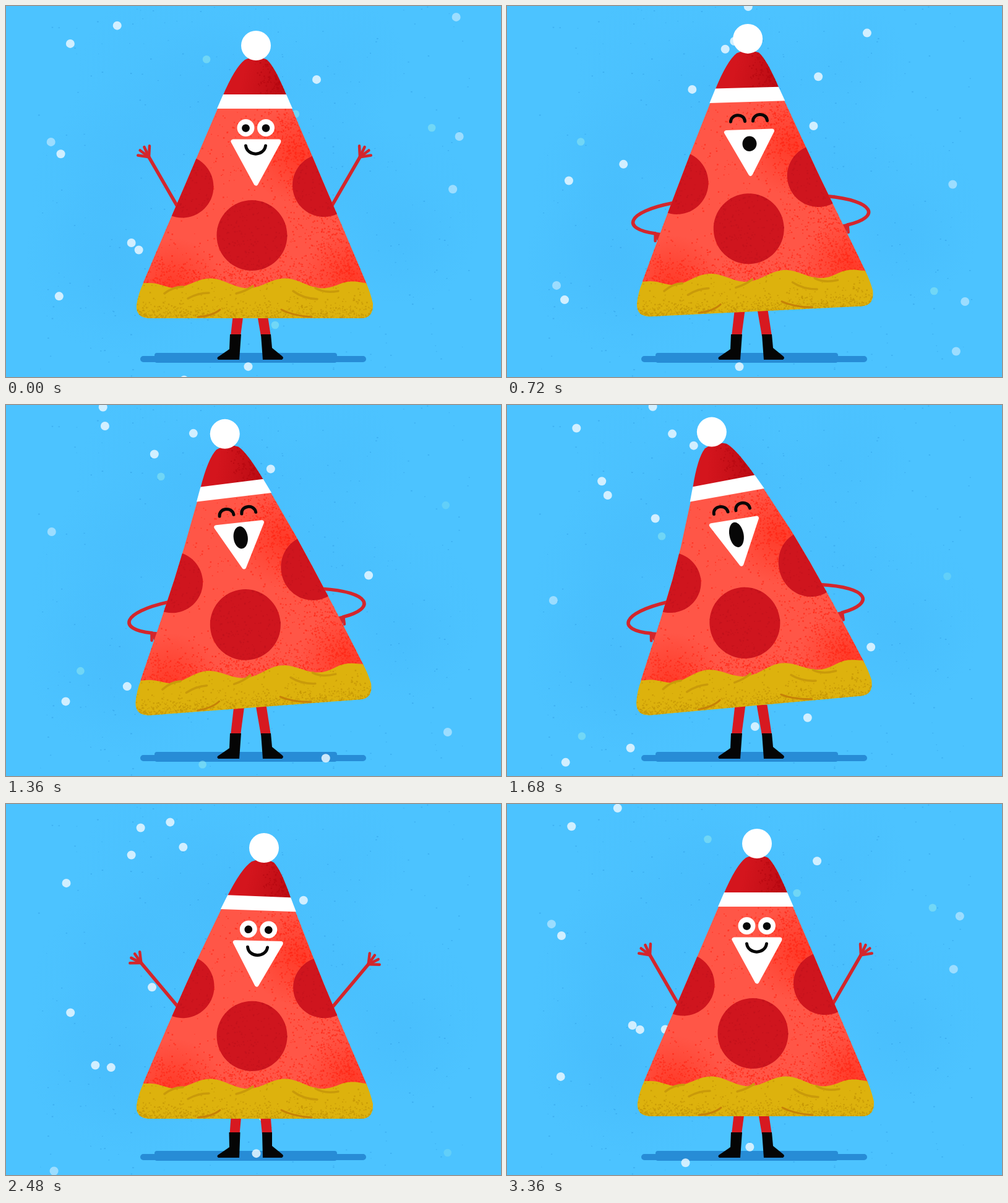
An HTML page with a canvas for the animation above (3.44 s loop, 800 by 600 pixels).

```html
<!DOCTYPE html>
<html lang="en">
<head>
<meta charset="utf-8">
<title>Festive pizza slice</title>
<style>
  html, body { margin: 0; width: 100%; height: 100%; overflow: hidden; background: #4cc2ff; }
  canvas { display: block; width: 800px; height: 600px; }
</style>
</head>
<body>
<canvas id="stage" width="800" height="600"></canvas>
<script>
const LOOP = 3440, STEP = 80, STEPS = LOOP / STEP;
const stage = document.getElementById('stage');
const g = stage.getContext('2d');

let seed = 7;
function rnd(from = 0, to = 1) {
  seed = (seed * 16807) % 2147483647;
  return from + (to - from) * seed / 2147483647;
}
const rad = deg => deg * Math.PI / 180;
const lerp = (a, b, u) => a + (b - a) * u;
const clamp = v => Math.max(0, Math.min(1, v));
const bump = (v, mid, width) => Math.exp(-(((v - mid) / width) ** 2));

// tilt and raise in degrees; lift stretches the top; hips is 1 with hands on hips
const rest = { tilt: 0, drop: 0, bend: 0, lift: 0, mouth: 5, hips: 0, raise: 60 };
const song = { ...rest, drop: -2, hips: 1, raise: -10 };
const keys = [
  { t: 0, ...rest },
  { t: 80, ...rest },
  { t: 400, ...song, tilt: -2.5, bend: 10, mouth: 8 },
  { t: 960, ...song, tilt: -3, bend: 5, mouth: 15 },
  { t: 1680, ...song, tilt: -5.2, bend: -32, lift: -6, mouth: 20 },
  { t: 2080, ...rest, tilt: 1.4, drop: 2, bend: 27, lift: 6, raise: -10 },
  { t: 2480, ...rest, drop: 4, bend: 13, lift: 3, raise: 50 },
  { t: 2880, ...rest },
  { t: LOOP, ...rest }
];

function poseAt(t) {
  const i = keys.findIndex(k => k.t > t);
  const a = keys[i - 1], b = keys[i], u = (t - a.t) / (b.t - a.t);
  const mixed = {};
  for (const name in rest) mixed[name] = lerp(a[name], b[name], u * u * (3 - 2 * u));
  return mixed;
}

// Bends the upper body, then tilts everything about the lower left corner.
let pose;
function turn(x, y) {
  const c = Math.cos(rad(pose.tilt)), s = Math.sin(rad(pose.tilt));
  return [x * c - y * s, x * s + y * c];
}
function warp(x, y) {
  const s = Math.max(0, 400 - y) / 336, u = x - 404;
  const lean = 1.4 * pose.bend / 336 * s ** 1.2;
  const [px, py] = turn(
    404 + pose.bend * s ** 2.2 + u * Math.cos(lean) - 215,
    y + pose.lift * s + u * Math.sin(lean) - 505);
  return [215 + px, 505 + py + pose.drop];
}

const path = (d, shift = 0) => new Path2D(
  d.replace(/(-?[\d.]+)[ ,]+(-?[\d.]+)/g, (_, x, y) => warp(+x, +y + shift).map(v => v.toFixed(2)).join(' '))
);
function oval(x, y, rx, ry = rx) {
  const k = 0.5523, a = rx * k, b = ry * k;
  return `M${x - rx} ${y}C${x - rx} ${y - b} ${x - a} ${y - ry} ${x} ${y - ry}` +
    `C${x + a} ${y - ry} ${x + rx} ${y - b} ${x + rx} ${y}` +
    `C${x + rx} ${y + b} ${x + a} ${y + ry} ${x} ${y + ry}` +
    `C${x - a} ${y + ry} ${x - rx} ${y + b} ${x - rx} ${y}Z`;
}
function fill(p, color) { g.fillStyle = color; g.fill(p); }
function line(p, color, width) {
  g.strokeStyle = color;
  g.lineWidth = width;
  g.stroke(p);
}
function disc(x, y, r, color) {
  g.fillStyle = color;
  g.beginPath();
  g.arc(x, y, r, 0, 7);
  g.fill();
}

// Speckles scattered by a density rule.
function scatter(count, x, y, w, h, density) {
  const dots = [];
  while (count--) {
    const px = rnd(x, x + w), py = rnd(y, y + h);
    if (rnd() < density(px, py)) dots.push([px, py, rnd(1, 2.6)]);
  }
  return dots;
}
const rightEdge = y => 462 + (y - 166) * 0.426;
const sauceGrain = scatter(13000, 222, 166, 362, 290, (x, y) =>
  0.04 + 0.8 * bump(x, rightEdge(y) - 15, 45) * bump(y, 240, 65) +
  0.55 * bump(y, 450, 32) + 0.5 * bump(x, rightEdge(y), 55) * bump(y, 400, 75));
const meatGrain = scatter(1600, 270, 240, 270, 190, () => 0.6);
const hatGrain = scatter(900, 352, 84, 102, 60, x => 0.8 * clamp((x - 400) / 50));
const crustGrain = scatter(4000, 211, 440, 382, 66, (x, y) => 0.04 + 0.8 * bump(y, 505, 18));

function speckle(dots, color, clip) {
  g.save();
  g.clip(clip);
  g.fillStyle = color;
  for (const [x, y, size] of dots) {
    const [px, py] = warp(x, y);
    g.fillRect(px, py, size, size);
  }
  g.restore();
}
function glow(ctx, x, y, r, rgb, strength) {
  const soft = ctx.createRadialGradient(x, y, 0, x, y, r);
  soft.addColorStop(0, `rgba(${rgb},${strength})`);
  soft.addColorStop(1, `rgba(${rgb},0)`);
  ctx.fillStyle = soft;
  return soft;
}

function makeBackdrop() {
  const c = document.createElement('canvas');
  c.width = 800;
  c.height = 600;
  const b = c.getContext('2d');
  b.fillStyle = '#4cc3ff';
  b.fillRect(0, 0, 800, 600);
  for (let i = 0; i < 14; i++) {
    glow(b, rnd(150, 650), rnd(40, 500), rnd(90, 170), '62,176,246', 0.13);
    b.fillRect(0, 0, 800, 600);
  }
  b.fillStyle = 'rgba(38,142,218,.4)';
  for (const [x, y, size] of scatter(330, 50, 0, 700, 600, () => 0.9)) b.fillRect(x, y, size, size * 0.7);
  b.fillStyle = '#278cd6';
  b.beginPath();
  b.roundRect(217, 566, 365, 10, 5);
  b.roundRect(240, 561, 295, 16, 4);
  b.fill();
  return c;
}
const backdrop = makeBackdrop();

// Each flake falls once per loop, starting at its own moment.
const flakes = Array.from({ length: 42 }, (_, i) => ({
  x: rnd(50, 750), born: (i + rnd()) * STEPS / 42, speed: rnd(24, 31), sway: rnd(-1, 1), faint: rnd() < 0.22
}));
function drawSnow(step) {
  for (const { x, born, speed, sway, faint } of flakes) {
    const age = (step - born + STEPS) % STEPS;
    const y = age * speed - 8;
    if (y > 608) continue;
    g.globalAlpha = x < 80 || x > 690 ? 0.6 : 1;
    disc(x + sway * age, y, faint ? 6.3 : 7, faint ? 'rgba(135,228,240,.62)' : 'rgba(228,245,255,.88)');
  }
  g.globalAlpha = 1;
}

function drawLegs() {
  const splay = Math.max(0, pose.lift) / 6;
  const left = 371 - 3 * splay, right = 420 + 4 * splay;
  for (const [hip, boot] of [[377 - 7 * splay, left], [412 + 11 * splay, right]])
    fill(new Path2D(`M${hip - 8.5} 485H${hip + 8.5}L${boot + 8} 534H${boot - 8}Z`), '#d71920');
  fill(new Path2D(`M${left - 9} 531H${left + 9}L377 572H343Q339 569 345 566L361 555Z`), '#050505');
  fill(new Path2D(`M${right - 8} 531H${right + 8}L430 553L446 566Q450 569 446 572H415Z`), '#050505');
}

// side is 1 for the arm on the left, -1 for the one on the right
function drawArm(shoulderX, side) {
  const red = '#d3262c', { hips, raise } = pose;
  const curl = Math.max(0, 45 - raise) * 0.3 * (1 - hips);
  const reach = (length, angle) => [-length * Math.cos(rad(angle)), -length * Math.sin(rad(angle))];
  const waving = [reach(32, raise + curl), reach(62, raise + curl / 2), reach(92 - curl * 0.7, raise)];
  const resting = [[-77, 11], [-86, 38], [-31, 48]];
  const [x, y] = warp(shoulderX, 324);
  const [a, b, hand] = waving.map((p, i) => {
    const [dx, dy] = turn(side * lerp(p[0], resting[i][0], hips), lerp(p[1], resting[i][1], hips));
    return [x + dx, y + dy];
  });
  line(new Path2D(`M${x} ${y}C${[...a, ...b, ...hand].join(' ')}`), red, 5.5);

  const aim = Math.atan2(hand[1] - b[1], hand[0] - b[0]) + side * rad(50 * hips - 2 * curl);
  const finger = 18 - 6 * hips - curl * 0.15;
  for (let i = 0; i < 4; i++) {
    const angle = aim + side * rad(33 - 28 * i);
    line(new Path2D(`M${hand}L${hand[0] + Math.cos(angle) * finger} ${hand[1] + Math.sin(angle) * finger}`), red, 4.5);
  }
}

function crustTop() {
  let d = 'M222 448';
  for (let x = 228; x <= 584; x += 6) {
    const swell = 8 * Math.min(1, (x - 222) / 50, (584 - x) / 50);
    d += `L${x} ${448.5 - swell * Math.cos((x - 330) / 60.5 * Math.PI)}`;
  }
  return d;
}

function drawSlice() {
  const sauce = path('M345 160L342 166L312 236L290 288L262 353L222 447L218 475L588 475L583 450L542 353L514 288L492 236L462 166L459 160Z');
  fill(sauce, '#ff5647');
  for (const [x, y] of [[472, 240], [270, 455], [560, 440]]) {
    glow(g, ...warp(x, y), 80, '255,40,20', 0.6);
    g.fill(sauce);
  }
  speckle(sauceGrain, 'rgba(255,38,20,.65)', sauce);

  const meat = new Path2D();
  for (const [x, y, r] of [[397.5, 371, 57], [285, 292, 50.5], [514, 290, 51]]) meat.addPath(path(oval(x, y, r)));
  g.save();
  g.clip(sauce);
  fill(meat, '#cf151e');
  speckle(meatGrain, 'rgba(184,16,28,.45)', meat);
  g.restore();

  const crust = path(crustTop() + 'Q588 460 593 481Q594 505 574 505L400 505L230 505Q209 503 211 483Q214 464 222 448Z');
  fill(crust, '#ddb20d');
  speckle(crustGrain, 'rgba(196,148,6,.7)', crust);
  const creases = 'M256 465Q270 454 286 454M294 473Q310 464 328 464M372 465Q388 461 399 453' +
    'M464 461Q480 473 503 474M500 456Q514 465 537 461';
  line(path(creases), '#c99a0a', 3.5);
  line(path('M310 503Q334 501 346 491M445 491Q464 501 494 503'), '#c68107', 3);

  const hat = path('M350 146Q370 99 386 87Q404 79 422 87Q435 99 454 146Z');
  const shade = g.createLinearGradient(...warp(365, 110), ...warp(450, 130));
  shade.addColorStop(0.2, '#d4151d');
  shade.addColorStop(1, '#bd0c14');
  fill(hat, shade);
  speckle(hatGrain, 'rgba(182,8,16,.7)', hat);
  fill(path('M351 143L453 143L463 166L341 166Z'), '#fff');
  disc(...warp(404, 64), 24, '#fff');
}

function drawFace(awake) {
  const { mouth } = pose, black = '#070707';
  const shift = -0.65 * (mouth - 5);
  const beard = path('M367 219L441 219L404 287Z', shift);
  fill(beard, '#fff');
  line(beard, '#fff', 7);
  if (awake) {
    for (const x of [387.5, 420]) {
      fill(path(oval(x, 197, 14), shift), '#fff');
      fill(path(oval(x, 197.5, 6.3), shift), black);
    }
    line(path('M387.5 226C390 243.5 417 243.5 419.5 226', shift), black, 5);
  } else {
    for (const x of [386, 422])
      line(path(`M${x - 11.5} 202C${x - 11} 188.5 ${x + 11} 188.5 ${x + 11.5} 202`, shift), black, 5);
    fill(path(oval(404, 236 + mouth * 0.2, 11.5, mouth), shift), black);
  }
}

function draw(step) {
  const t = step * STEP;
  pose = poseAt(t);
  g.lineCap = g.lineJoin = 'round';
  g.drawImage(backdrop, 0, 0);
  drawSnow(step);
  drawLegs();
  drawArm(277, 1);
  drawArm(526, -1);
  drawSlice();
  drawFace(t < 240 || t >= 1840);
}

const start = performance.now();
let shown = -1;
function tick() {
  const step = Math.floor(((performance.now() - start) % LOOP) / STEP);
  if (step !== shown) draw(shown = step);
  requestAnimationFrame(tick);
}
tick();
</script>
</body>
</html>
```
